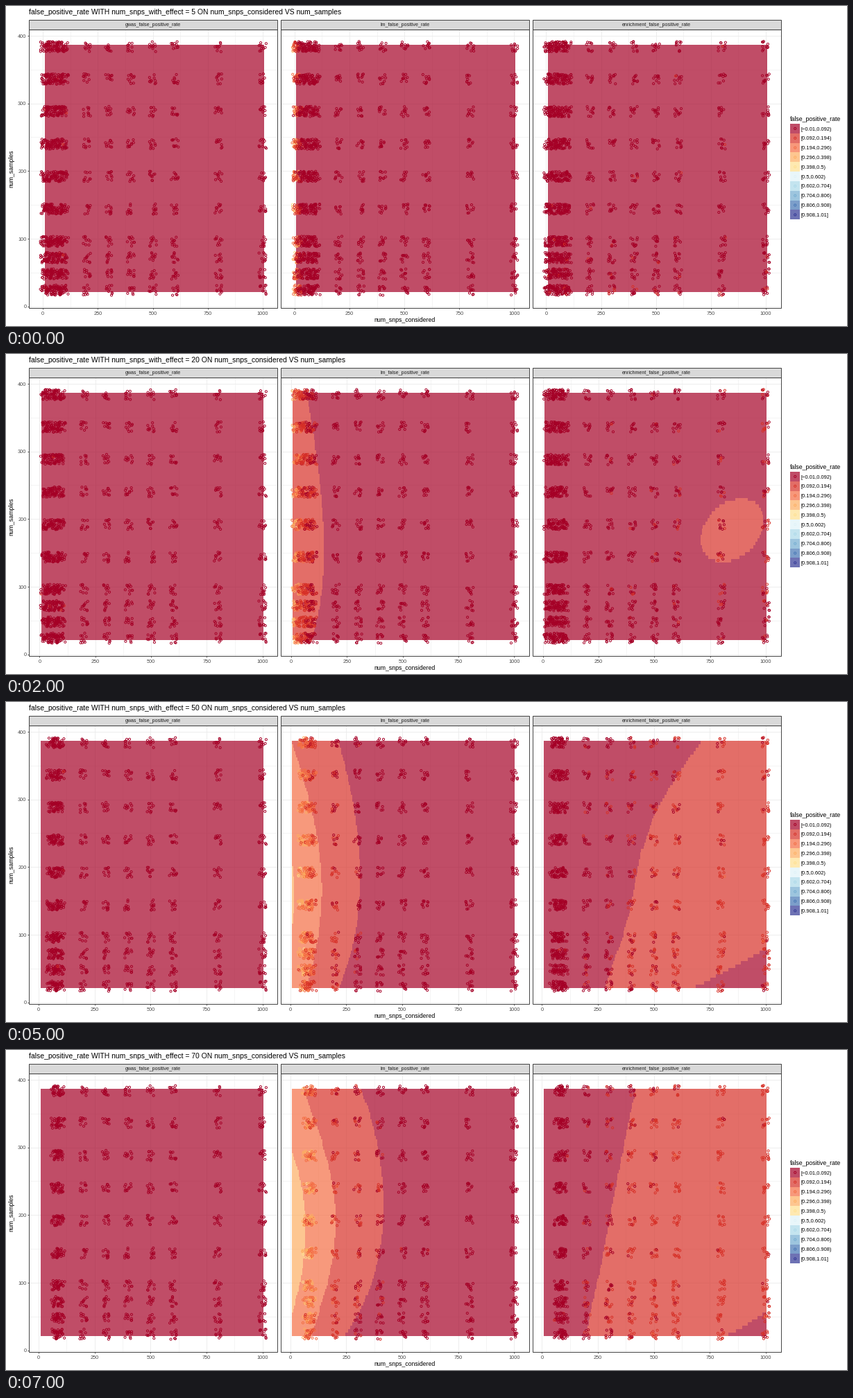
These frames come from a looping animation (1212x462 px, 8000 ms). A matplotlib script:

```python
import numpy as np
import matplotlib.pyplot as plt
from matplotlib.animation import FuncAnimation
from matplotlib.colors import to_rgb
from matplotlib.patches import Rectangle
from matplotlib.path import Path

W, H, DPI = 1212, 462, 64
PT = 72 / DPI  # points per pixel
plt.rcParams["font.family"] = "Liberation Sans"

EFFECTS = [5, 10, 20, 30, 40, 50, 60, 70]
SNPS = [5, *range(10, 101, 10), 200, 300, 400, 500, 600, 800, 1000]
SAMPLES = np.array([24, 48, 72, 96, 144, 192, 240, 288, 336, 384])
REPS = 10
CELLS = np.repeat(SAMPLES, REPS)
JITTER_X, JITTER_Y = 16.5, 7.6

rng = np.random.default_rng(7)
SHIFT = rng.uniform(-1, 1, (3, len(SNPS), 2, CELLS.size))
NOISE = rng.standard_normal((len(EFFECTS), 3, len(SNPS), CELLS.size))

PALETTE = ["#A50026", "#D73027", "#F46D43", "#FDAE61", "#FEE090",
           "#E0F3F8", "#ABD9E9", "#74ADD1", "#4575B4", "#313695"]
RGB = np.array([to_rgb(c) for c in PALETTE])
ALPHA = 0.7
BINS = ["[\u22120.01,0.092)", "[0.092,0.194)", "[0.194,0.296)",
        "[0.296,0.398)", "[0.398,0.5)", "[0.5,0.602)", "[0.602,0.704)",
        "[0.704,0.806)", "[0.806,0.908)", "[0.908,1.01]"]

PANELS = [("gwas_false_positive_rate", 33.3),
          ("lm_false_positive_rate", 395.9),
          ("enrichment_false_positive_rate", 758.5)]
PANEL_W, TOP, BOTTOM = 358, 33.5, 435.5
Y_ZERO, Y_SCALE = 433.7, 0.977

# Band edges in the middle panel: x at five evenly spaced heights
KNOTS = np.linspace(-2, 2, 5)
LM_EDGES = {
    10: [[404, 417, 425, 425, 410]],
    20: [[433, 447.5, 457, 457.5, 440]],
    30: [[452, 469.5, 481, 480, 461], [385, 407, 426, 427.5, 412]],
    40: [[470, 484, 496, 494.5, 471], [402, 425, 441, 441, 425]],
    50: [[479, 500, 510, 505.5, 480], [411, 438, 453.5, 452, 434],
         [328, 384, 412.5, 412.5, 384]],
    70: [[511, 537, 544, 531, 488], [429, 459, 475, 466.5, 440],
         [361, 411, 431, 426, 402]],
}
LM_EDGES[60] = [np.mean(pair, axis=0) for pair in zip(LM_EDGES[50], LM_EDGES[70])]

# Outlines of the raised region in the right panel
theta = np.linspace(0, 2 * np.pi, 90)
REGIONS = {
    20: np.column_stack([1046.3 + 45.3 * np.cos(theta),
                         254.3 - 45.3 * np.sin(theta + 0.3)]),
    30: [(1097, 126), (1045, 138), (1020, 150), (1000, 165), (980, 192),
         (958, 240), (951, 300), (944, 330), (931, 360), (917, 385),
         (912, 402), (925, 409), (950, 405), (1000, 383), (1097, 316)],
    40: [(1097, 66), (1045, 92), (998, 122), (965, 160), (938, 210),
         (924, 265), (912, 325), (900, 352), (883, 395), (877, 418),
         (965, 418), (1000, 401), (1097, 343)],
    50: [(1097, 50), (1007, 50), (967, 105), (935, 160), (914, 220),
         (903, 280), (897, 310), (886, 345), (861, 418), (978, 418),
         (1010, 403), (1097, 355)],
    70: [(1097, 50), (909, 50), (897, 105), (886, 160), (874, 220),
         (863, 280), (858, 310), (849, 345), (834, 418), (1022, 418),
         (1055, 404), (1097, 376)],
}
REGIONS[60] = np.mean([REGIONS[50], REGIONS[70]], axis=0)


def y_px(y):
    return Y_ZERO - Y_SCALE * np.asarray(y)


def x_mapper(effect, left):
    """Linear x scale with 5 % padding around the data."""
    lo = min(7.5, effect - JITTER_X)
    hi = 1000 + JITTER_X
    scale = PANEL_W / 1.1 / (hi - lo)
    start = left + PANEL_W * 0.05 / 1.1
    return lambda x: start + (np.asarray(x) - lo) * scale


def tile_classes(panel, effect, xs, ys):
    gx, gy = np.meshgrid(xs, ys)
    level = np.zeros(gx.shape, int)
    if panel == 1:
        for edge in LM_EDGES.get(effect, []):
            curve = np.polyfit(KNOTS, edge, 4)
            level += gx < np.polyval(curve, (gy - 234) / 89)
    elif panel == 2 and effect in REGIONS:
        centres = np.column_stack([gx.ravel(), gy.ravel()])
        level += Path(REGIONS[effect]).contains_points(centres).reshape(gx.shape)
    return level


def mean_rate(panel, effect, x, y):
    """Expected rate and its spread at one grid column."""
    if panel == 0:
        return 0.03 + 0 * y, 0.026 if x <= 100 else 0.014
    if panel == 1:
        rate = 0.35 * (effect / x) ** 0.7 - 0.03
        return rate * (1.05 - ((y - 170) / 400) ** 2), 0.012 + 0.16 * max(rate, 0)
    rate = 0.17 * (1 - np.exp(-x * effect / 23500))
    rate = rate * (1 - 0.5 * x / 1000 * np.exp(-y / 40)) * (1 - 0.2 * (y / 384) ** 2)
    spread = 0.025 + (0.045 * np.exp(-y / 110) if effect <= 10 else 0)
    return rate, spread


def points(panel, effect):
    px, py, cls = [], [], []
    for k, x in enumerate(SNPS):
        if x < effect:
            continue
        dx, dy = SHIFT[panel, k]
        px.append(x + JITTER_X * dx)
        py.append(CELLS + JITTER_Y * dy)
        rate, spread = mean_rate(panel, effect, x, CELLS)
        value = rate + spread * NOISE[EFFECTS.index(effect), panel, k]
        cls.append(np.clip((value + 0.01) / 0.102, 0, 5).astype(int))
    return np.concatenate(px), np.concatenate(py), np.concatenate(cls)


def label(x, y, text, size, color="black", ha="left", **kw):
    ax.text(x, y, text, fontsize=size * PT, color=color, ha=ha,
            va="baseline", **kw)


def box(x, y, w, h, fill, edge, lw, z):
    ax.add_patch(Rectangle((x, y), w, h, facecolor=fill, edgecolor=edge,
                           linewidth=lw * PT, zorder=z))


def line(xs, ys, color, lw, z):
    ax.plot(xs, ys, color=color, lw=lw * PT, zorder=z, solid_capstyle="butt")


def rings(x, y, colors):
    ax.scatter(x, y, s=(3.1 * PT) ** 2, facecolors="none", edgecolors=colors,
               linewidths=0.95 * PT, zorder=4)


def draw_panel(panel, effect):
    name, left = PANELS[panel]
    right = left + PANEL_W
    to_x = x_mapper(effect, left)

    for i, v in enumerate(range(0, 1001, 125)):
        line([to_x(v)] * 2, [TOP, BOTTOM], "#EBEBEB", 0.5 if i % 2 else 0.9, 1)
    for i, v in enumerate(range(0, 401, 50)):
        line([left, right], [y_px(v)] * 2, "#EBEBEB", 0.5 if i % 2 else 0.9, 1)

    gx, gy = np.arange(10, 1001, 5), np.arange(384, 23, -5)
    level = tile_classes(panel, effect, to_x(gx), y_px(gy))
    rgba = np.dstack([RGB[level], np.full(level.shape, ALPHA)])
    ax.imshow(rgba, extent=[to_x(7.5), to_x(1002.5), y_px(21.5), y_px(386.5)],
              aspect="auto", interpolation="nearest", origin="upper", zorder=2)

    x, y, cls = points(panel, effect)
    rings(to_x(x), y_px(y), RGB[cls])

    box(left, TOP, PANEL_W, BOTTOM - TOP, "none", "#333333", 0.9, 5)
    box(left, 19.5, PANEL_W, TOP - 19.5, "#D9D9D9", "#333333", 0.9, 5)
    label(left + PANEL_W / 2, 29, name, 7.1, "#1A1A1A", "center", zorder=6)
    for v in range(0, 1001, 250):
        line([to_x(v)] * 2, [BOTTOM, BOTTOM + 2.5], "#333333", 0.8, 5)
        label(to_x(v), 445.5, str(v), 7.4, "#4D4D4D", "center")


def draw_legend():
    label(1130, 166.5, "false_positive_rate", 8.75)
    step = 13.83
    for i, (color, text) in enumerate(zip(PALETTE, BINS)):
        y = 170 + i * step
        ax.add_patch(Rectangle((1130.3, y), step, step, facecolor=color,
                               alpha=ALPHA, linewidth=0))
        rings([1130.3 + step / 2], [y + step / 2], color)
        label(1145.3, y + step / 2 + 2.6, text, 7.5)


def draw(i):
    effect = EFFECTS[i]
    ax.clear()
    ax.set_axis_off()
    label(33, 12, f"false_positive_rate WITH num_snps_with_effect = {effect} "
          "ON num_snps_considered VS num_samples", 10.42)
    for panel in range(3):
        draw_panel(panel, effect)
    for v in range(0, 401, 100):
        line([30.5, PANELS[0][1]], [y_px(v)] * 2, "#333333", 0.8, 5)
        label(29.5, y_px(v) + 2.6, str(v), 7.4, "#4D4D4D", "right")
    label(574.7, 455.7, "num_snps_considered", 8.8, ha="center")
    label(10.5, 234.5, "num_samples", 8.8, ha="center", rotation=90,
          rotation_mode="anchor")
    draw_legend()
    ax.set_xlim(0, W)
    ax.set_ylim(H, 0)
    return []


fig = plt.figure(figsize=(W / DPI, H / DPI), dpi=DPI, facecolor="white")
ax = fig.add_axes([0, 0, 1, 1])
anim = FuncAnimation(fig, draw, frames=len(EFFECTS), interval=1000,
                     repeat=True, repeat_delay=0)
plt.show()
```
